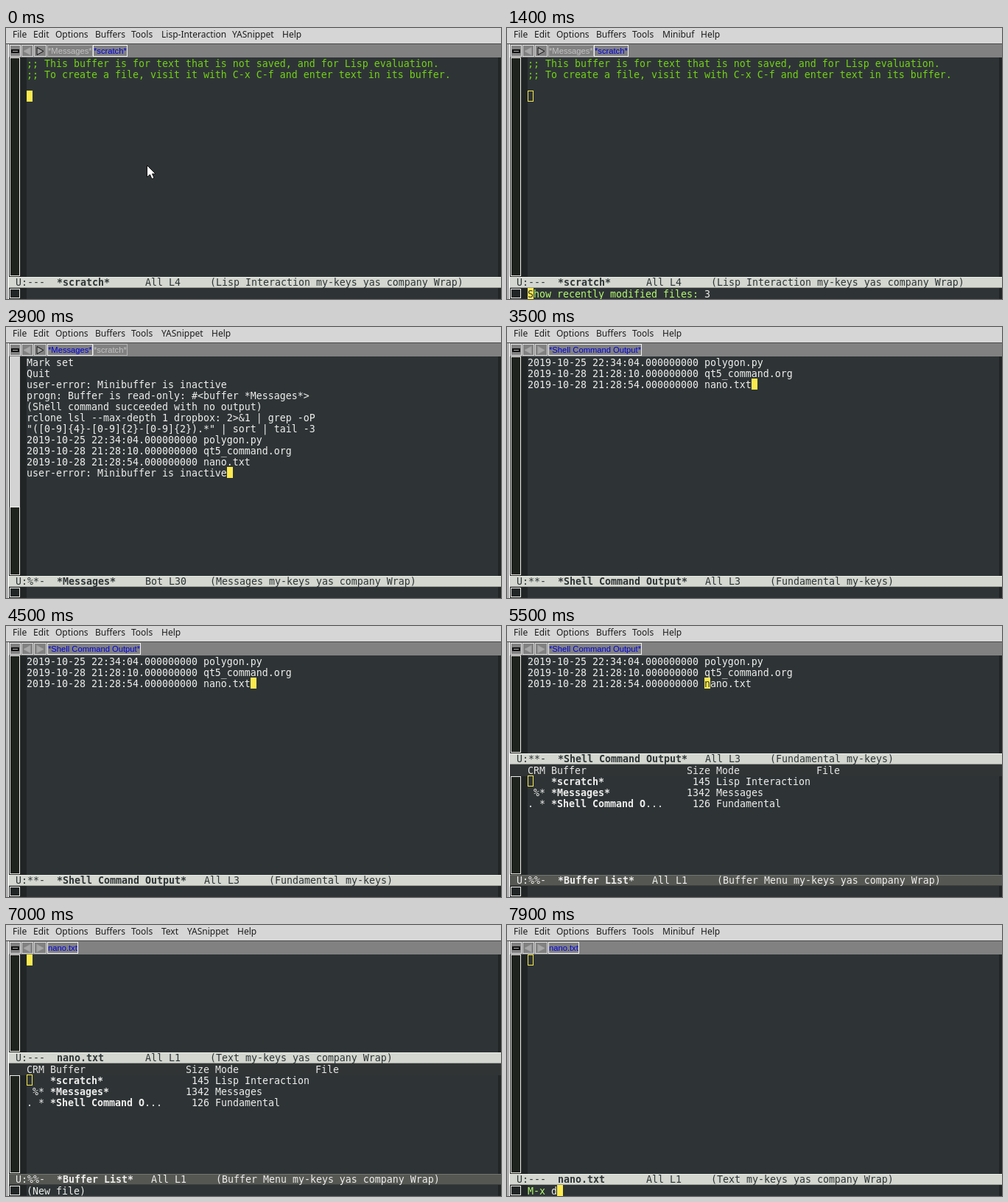
An HTML page with a canvas for the animation above (8000 ms loop, 672 by 368 pixels).

```html
<!DOCTYPE html>
<html>
<head>
<meta charset="utf-8">
<title>Editor session</title>
<style>
html, body { margin: 0; width: 100%; height: 100%; overflow: hidden; background: #d6d6d6; }
canvas { display: block; }
</style>
</head>
<body>
<canvas id="stage" width="672" height="368"></canvas>
<script>
const g = document.getElementById('stage').getContext('2d');
const LOOP = 8000, CW = 8, LH = 15, BASE = 13, LEFT = 28, BOTTOM = 368;
const MONO = '13.29px "DejaVu Sans Mono", monospace';
const BG = '#2e3436', FG = '#eeeeec', YELLOW = '#fce94f', FRINGE = '#212526';
const GREEN = '#73d216', PROMPT = '#b4fa70', PALE = '#d3d7cf';

const files = [
  '2019-10-25 22:34:04.000000000 polygon.py',
  '2019-10-28 21:28:10.000000000 qt5_command.org',
  '2019-10-28 21:28:54.000000000 nano.txt'
];
const both = ['*Messages*', '*scratch*'];

const scratch = {
  name: '*scratch*', flags: 'U:---', pos: 'All L4', tabs: both, color: GREEN,
  modes: 'Lisp Interaction my-keys yas company Wrap', menu: ['Lisp-Interaction', 'YASnippet'],
  lines: [
    ';; This buffer is for text that is not saved, and for Lisp evaluation.',
    ';; To create a file, visit it with C-x C-f and enter text in its buffer.'
  ]
};
const messages = {
  name: '*Messages*', flags: 'U:%*-', pos: 'Bot L30', tabs: both, thumb: 204,
  modes: 'Messages my-keys yas company Wrap', menu: ['YASnippet'],
  lines: [
    'Mark set', 'Quit', 'user-error: Minibuffer is inactive',
    'progn: Buffer is read-only: #<buffer *Messages*>',
    '(Shell command succeeded with no output)',
    'rclone lsl --max-depth 1 dropbox: 2>&1 | grep -oP',
    '"([0-9]{4}-[0-9]{2}-[0-9]{2}).*" | sort | tail -3',
    ...files, 'user-error: Minibuffer is inactive'
  ]
};
const output = {
  name: '*Shell Command Output*', flags: 'U:**-', pos: 'All L3', tabs: ['*Shell Command Output*'],
  modes: 'Fundamental my-keys', menu: [], lines: files
};
const nano = {
  name: 'nano.txt', flags: 'U:---', pos: 'All L1', tabs: ['nano.txt'],
  modes: 'Text my-keys yas company Wrap', menu: ['Text', 'YASnippet'], lines: []
};
const bufferList = { name: '*Buffer List*', flags: 'U:%%-', pos: 'All L1', modes: 'Buffer Menu my-keys yas company Wrap' };

const ask = 'Show recently modified files: ';
// Each scene holds until the next; "at" is in ms.
const scenes = [
  { at: 0, buf: scratch, cur: [0, 3], pointer: true },
  { at: 600, buf: scratch, cur: [0, 3], mini: [ask, '', 30] },
  { at: 1000, buf: scratch, cur: [0, 3], mini: [ask, '3', 31] },
  { at: 1200, buf: scratch, cur: [0, 3], mini: [ask, '3', 0] },
  { at: 1700, buf: scratch, cur: [0, 3], echo: files },
  { at: 2100, buf: scratch, cur: [0, 3], echo: ['user-error: Minibuffer is inactive'] },
  { at: 2400, buf: messages, cur: [34, 10] },
  { at: 3300, buf: output, cur: [38, 2] },
  { at: 5000, buf: output, cur: [30, 2] },
  { at: 5500, buf: output, cur: [30, 2], split: true },
  { at: 6700, buf: nano, cur: [0, 0], split: true, echo: ['(New file)'] },
  { at: 7300, buf: nano, cur: [0, 0] },
  { at: 7600, buf: nano, cur: [0, 0], mini: ['M-x ', '', 4] },
  { at: 7800, buf: nano, cur: [0, 0], mini: ['M-x ', 'd', 5] }
];

function rect(x, y, w, h, color) {
  g.fillStyle = color;
  g.fillRect(x, y, w, h);
}

function outline(x, y, w, h, color) {
  g.strokeStyle = color;
  g.lineWidth = 1;
  g.strokeRect(x + .5, y + .5, w - 1, h - 1);
}

function text(s, x, y, color, font = MONO) {
  g.font = font;
  g.fillStyle = color;
  g.fillText(s, x, y);
}

function row(s, col, top, color = FG, bold = false) {
  text(s, LEFT + col * CW, top + BASE, color, bold ? 'bold ' + MONO : MONO);
}

function cursor(col, top, solid, under = '') {
  const x = LEFT + col * CW;
  if (!solid) return outline(x, top, CW, LH, YELLOW);
  rect(x, top, CW, LH, YELLOW);
  row(under, col, top, BG);
}

function drawMenu(items) {
  const step = { File: 28, Edit: 30, Options: 54, Buffers: 49, Tools: 41, 'Lisp-Interaction': 96, YASnippet: 68, Minibuf: 52, Text: 35 };
  let x = 9;
  for (const item of ['File', 'Edit', 'Options', 'Buffers', 'Tools', ...items, 'Help']) {
    text(item, x, 13, '#1c1c1c', '12px "Noto Sans", "Open Sans", sans-serif');
    x += step[item];
  }
}

function arrow(x, dir, fill, line) {
  g.beginPath();
  g.moveTo(x - 4 * dir, 26.5);
  g.lineTo(x + 5 * dir, 31.5);
  g.lineTo(x - 4 * dir, 36.5);
  g.closePath();
  g.fillStyle = fill;
  g.fill();
  g.strokeStyle = line;
  g.stroke();
}

function drawTabs(buf) {
  const box = (x, w, color) => outline(x, 23, w, 16, color);
  rect(4, 22, 668, 18, '#818181');
  box(5, 15, '#e4e4e4');
  rect(7, 29, 11, 5, '#111');
  rect(9, 31, 7, 1, '#b0b0b0');
  box(21, 16, '#d8d8d8');
  box(38, 17, '#d8d8d8');
  arrow(29, -1, '#a8a8a8', '#a0a0a0');
  if (buf.tabs.length > 1) arrow(46, 1, '#a0a0a0', '#111');
  else arrow(46, 1, '#a8a8a8', '#a0a0a0');
  const font = '11.2px "Liberation Sans", Arial, sans-serif';
  let x = 56;
  for (const tab of buf.tabs) {
    const on = tab === buf.name;
    g.font = font;
    const w = Math.round(g.measureText(tab).width) + 2;
    box(x, w, on ? '#f4f4f4' : '#b4b4b4');
    text(tab, x + 1, 35, on ? '#0000e0' : '#c2c2c2', font);
    x += w;
  }
}

function drawPane(top, bottom, thumbOffset = 0) {
  rect(4, top, 668, bottom - top, FRINGE);
  rect(LEFT, top, 640, bottom - top, BG);
  rect(5, top, 14, bottom - top, '#d3d3d3');
  const y = top + thumbOffset, h = bottom - y - 1;
  rect(5, y, 14, h + 1, '#1f231e');
  outline(5, y, 14, h, '#f0f0ec');
}

function drawModeLine(buf, top, active) {
  const color = active ? BG : FG;
  rect(4, top, 668, LH, active ? PALE : '#555753');
  rect(4, top, 668, 1, active ? '#eef0ea' : '#73756f');
  rect(4, top + LH - 1, 668, 1, active ? '#9b9e97' : '#3c3d3a');
  const y = top + BASE - 1;
  text(buf.flags, 13, y, color);
  text(buf.name, 69, y, color, 'bold ' + MONO);
  const x = 69 + (Math.max(12, buf.name.length) + 3) * CW;
  text(buf.pos.padEnd(11) + '(' + buf.modes + ')', x, y, color);
}

function drawBufferList(top, bottom) {
  drawPane(top, bottom, LH + 1);
  rect(4, top, 668, LH + 1, '#303435');
  [['CRM', 0], ['Buffer', 4], ['Size', 27], ['Mode', 32], ['File', 49]]
    .forEach(([s, col]) => row(s, col, top, '#e5e5e5'));
  [
    ['', '*scratch*', '', 145, 'Lisp Interaction'],
    [' %*', '*Messages*', '', 1342, 'Messages'],
    ['. *', '*Shell Command O', '...', 126, 'Fundamental']
  ].forEach(([flags, name, more, size, mode], i) => {
    const y = top + LH * (i + 1);
    row(flags, 0, y);
    row(name, 4, y, FG, true);
    row(more, 4 + name.length, y);
    row(String(size).padStart(4) + ' ' + mode, 27, y);
  });
  cursor(0, top + LH, false);
}

function drawMinibuffer({ mini, echo = [] }, top) {
  rect(4, top, 668, BOTTOM - top, FRINGE);
  rect(LEFT, top, 640, BOTTOM - top, BG);
  outline(5, top + 1, 14, BOTTOM - top - 2, '#f0f0ec');
  echo.forEach((s, i) => row(s, 0, top + i * LH));
  if (!mini) return;
  const [prompt, typed, col] = mini;
  row(prompt, 0, top, PROMPT);
  row(typed, prompt.length, top);
  cursor(col, top, true, (prompt + typed)[col]);
}

function drawPointer(x, y) {
  g.beginPath();
  [[0, 0], [0, 16], [4, 12.5], [6.5, 18.5], [9.5, 17], [7, 11.5], [11.5, 11.5]]
    .forEach(([dx, dy]) => g.lineTo(x + dx, y + dy));
  g.closePath();
  g.fillStyle = '#fff';
  g.fill();
  g.strokeStyle = '#101010';
  g.stroke();
}

function draw(t) {
  const s = scenes.findLast(scene => scene.at <= t), buf = s.buf;
  const miniTop = BOTTOM - LH * Math.max(1, (s.echo || []).length);
  const modeTop = s.split ? 173 : miniTop - LH;

  rect(0, 0, 672, BOTTOM, '#d6d6d6');
  rect(0, 21, 672, 1, '#484848');
  rect(1, 22, 1, 346, '#707070');
  rect(2, 22, 2, 346, '#ececec');
  drawMenu(s.mini ? ['Minibuf'] : buf.menu);
  drawTabs(buf);

  drawPane(40, modeTop, buf.thumb);
  buf.lines.forEach((line, i) => row(line, 0, 40 + i * LH, buf.color));
  const [col, line] = s.cur;
  cursor(col, 40 + line * LH, !s.mini, (buf.lines[line] || '')[col]);
  drawModeLine(buf, modeTop, true);

  if (s.split) {
    drawBufferList(modeTop + LH, miniTop - LH);
    drawModeLine(bufferList, miniTop - LH, false);
  }
  drawMinibuffer(s, miniTop);
  if (s.pointer) drawPointer(191.5, 186.5);
}

const start = performance.now();
function tick() {
  draw((performance.now() - start) % LOOP);
  requestAnimationFrame(tick);
}
tick();
</script>
</body>
</html>
```
